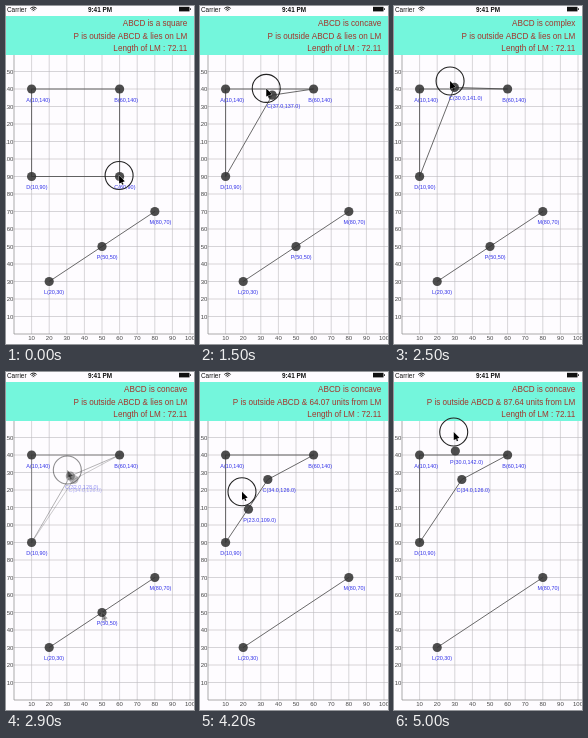
An HTML page with a canvas for the animation above (5.1 s loop, 188 by 338 pixels).

```html
<!DOCTYPE html>
<html lang="en">
<head>
<meta charset="utf-8">
<style>
  html, body { margin: 0; width: 100%; height: 100%; overflow: hidden; background: #fff; }
  canvas { display: block; width: 188px; height: 338px; }
</style>
</head>
<body>
<canvas id="stage"></canvas>
<script>
const W = 188, H = 338, LOOP = 5100, STEP = 100, CUT = 2900;
const LINE = '#444', GRID = '#bcbabe', INK = '#111';
const canvas = document.getElementById('stage');
const ctx = canvas.getContext('2d');
const ratio = window.devicePixelRatio || 1;
canvas.width = W * ratio;
canvas.height = H * ratio;
ctx.scale(ratio, ratio);

const A = [10, 140], B = [60, 140], D = [10, 90], L = [20, 30], M = [80, 70];
const C_END = [34, 126], P_START = [50, 50];

// Each drag: time, point in graph units, pointer offset in pixels.
const dragC = [
  { t: 0, at: [60, 90], grip: [-0.5, -1] },
  { t: 1000, at: [46, 116], grip: [-6, -6.5] },
  { t: 2000, at: [27, 157], grip: [-6, -7] },
  { t: CUT, at: [32, 128], grip: [-3, -6] },
];
const dragP = [
  { t: 3000, at: P_START, grip: [0, 0] },
  { t: 3500, at: [42, 70], grip: [-9.4, -30] },
  { t: 4200, at: [23, 109], grip: [-6.5, -17.5] },
  { t: 5000, at: [30.3, 142.3], grip: [-1.6, -19] },
];

const px = x => 8 + 1.76 * x;
const py = y => 328 - 1.75 * y;
const toPixels = ([x, y]) => [px(x), py(y)];
const mix = (p, q, f) => p.map((v, i) => v + (q[i] - v) * f);

function pose(drag, t) {
  const i = Math.max(1, drag.findIndex(k => k.t >= t));
  const from = drag[i - 1], to = drag[i];
  const f = Math.max(0, (t - from.t) / (to.t - from.t));
  const point = mix(from.at, to.at, f), grip = mix(from.grip, to.grip, f);
  return { point, pointer: toPixels(point).map((v, j) => v + grip[j]) };
}

function text(str, x, y, size, color, align = 'left', weight = '') {
  ctx.font = `${weight} ${size}px "Liberation Sans", Arial, sans-serif`;
  ctx.fillStyle = color;
  ctx.textAlign = align;
  ctx.fillText(str, x, y);
}

function stroke(points, color, width, close) {
  ctx.beginPath();
  points.forEach(p => ctx.lineTo(...p));
  if (close) ctx.closePath();
  ctx.strokeStyle = color;
  ctx.lineWidth = width;
  ctx.stroke();
}

function dot(name, p, moved) {
  const [x, y] = toPixels(p);
  ctx.beginPath();
  ctx.arc(x, y, 4.6, 0, 7);
  ctx.fillStyle = 'rgba(50,50,50,.87)';
  ctx.fill();
  const label = p.map(v => moved ? Math.round(v).toFixed(1) : v).join();
  text(`${name}(${label})`, x - 5.3, y + 12.8, 5.45, '#3030e8');
}

function grid() {
  for (let v = 10; v <= 150; v += 10) {
    const x = px(v), y = py(v);
    if (v <= 100) {
      stroke([[x, 49], [x, 328]], GRID, 0.6);
      text(v, x, 334.2, 6, LINE, 'center');
    }
    stroke([[8, y], [W, y]], GRID, 0.6);
    text(v, 7.3, y + 2.1, 6, LINE, 'right');
  }
  stroke([[8, 49], [8, 328], [W, 328]], '#888', 0.7);
}

function statusBar() {
  text('Carrier', 1, 5.5, 6.4, INK);
  text('9:41 PM', 94, 5.5, 6.4, INK, 'center', 'bold');
  ctx.strokeStyle = INK;
  ctx.lineWidth = 1;
  for (let r = 1; r < 5; r += 1.7) {
    ctx.beginPath();
    ctx.arc(27.5, 5.5, r, -Math.PI * 0.76, -Math.PI * 0.24);
    ctx.stroke();
  }
  ctx.fillRect(173, 0.8, 10.5, 4.6);
  ctx.fillRect(184, 2.2, 0.8, 1.8);
}

function shapeName([x, y]) {
  if (x === 60 && y === 90) return 'a square';
  if (y > 140) return 'complex';
  return y > x + 80 ? 'concave' : 'convex';
}

function isInside([x, y], polygon) {
  return polygon.reduce((inside, [ax, ay], i) => {
    const [bx, by] = polygon[(i + 1) % polygon.length];
    const crosses = (ay > y) !== (by > y) && x < ax + (bx - ax) * (y - ay) / (by - ay);
    return crosses ? !inside : inside;
  }, false);
}

function header(C, P) {
  const dx = M[0] - L[0], dy = M[1] - L[1], length = Math.hypot(dx, dy);
  const gap = Math.abs(dx * (P[1] - L[1]) - dy * (P[0] - L[0])) / length;
  const side = isInside(P, [A, B, C, D]) ? 'inside' : 'outside';
  const relation = gap < 0.01 ? 'lies on' : `${gap.toFixed(2)} units from`;
  ctx.fillStyle = '#74f6dc';
  ctx.fillRect(0, 10, W, 39);
  [`ABCD is ${shapeName(C)}`, `P is ${side} ABCD & ${relation} LM`, `Length of LM : ${length.toFixed(2)}`]
    .forEach((line, i) => text(line, 181.3, 20 + 12.5 * i, 8.15, '#a3352c', 'right'));
}

function quad(C, moved, alpha) {
  ctx.globalAlpha = alpha;
  stroke([A, B, C, D].map(toPixels), LINE, 0.8, true);
  dot('C', C, moved);
  ctx.globalAlpha = 1;
}

function pointerMark([x, y], alpha, ring = true) {
  ctx.globalAlpha = alpha;
  if (ring) {
    ctx.beginPath();
    ctx.arc(x, y, 14, 0, 7);
    ctx.strokeStyle = '#222';
    ctx.lineWidth = 1.1;
    ctx.stroke();
  }
  const head = [[x, y], [x, y + 8], [x + 5.7, y + 5.7]];
  stroke([[x + 2, y + 5], [x + 3.8, y + 9]], INK, 1.5);
  stroke(head, '#fff', 0.6, true);
  ctx.fillStyle = '#000';
  ctx.fill();
  ctx.globalAlpha = 1;
}

function draw(t) {
  const onC = t <= CUT, cutting = t === CUT;
  const { point, pointer } = pose(onC ? dragC : dragP, t);
  const C = onC ? point : C_END, P = onC ? P_START : point;

  ctx.fillStyle = '#fefcff';
  ctx.fillRect(0, 0, W, H);
  grid();
  statusBar();
  header(C.map(Math.round), P.map(Math.round));

  quad(C, t > 0, cutting ? 0.5 : 1);
  stroke([L, M].map(toPixels), LINE, 0.8);
  Object.entries({ A, B, D, L, M }).forEach(([name, p]) => dot(name, p));
  dot('P', P, t > dragP[0].t);
  pointerMark(pointer, cutting ? 0.5 : 1);

  // The cut between the two drags is a short dissolve.
  if (cutting) {
    quad(C_END, true, 0.35);
    pointerMark(toPixels(P_START), 0.35, false);
  }
}

function tick() {
  draw(Math.floor(performance.now() % LOOP / STEP) * STEP);
  requestAnimationFrame(tick);
}
tick();
</script>
</body>
</html>
```
